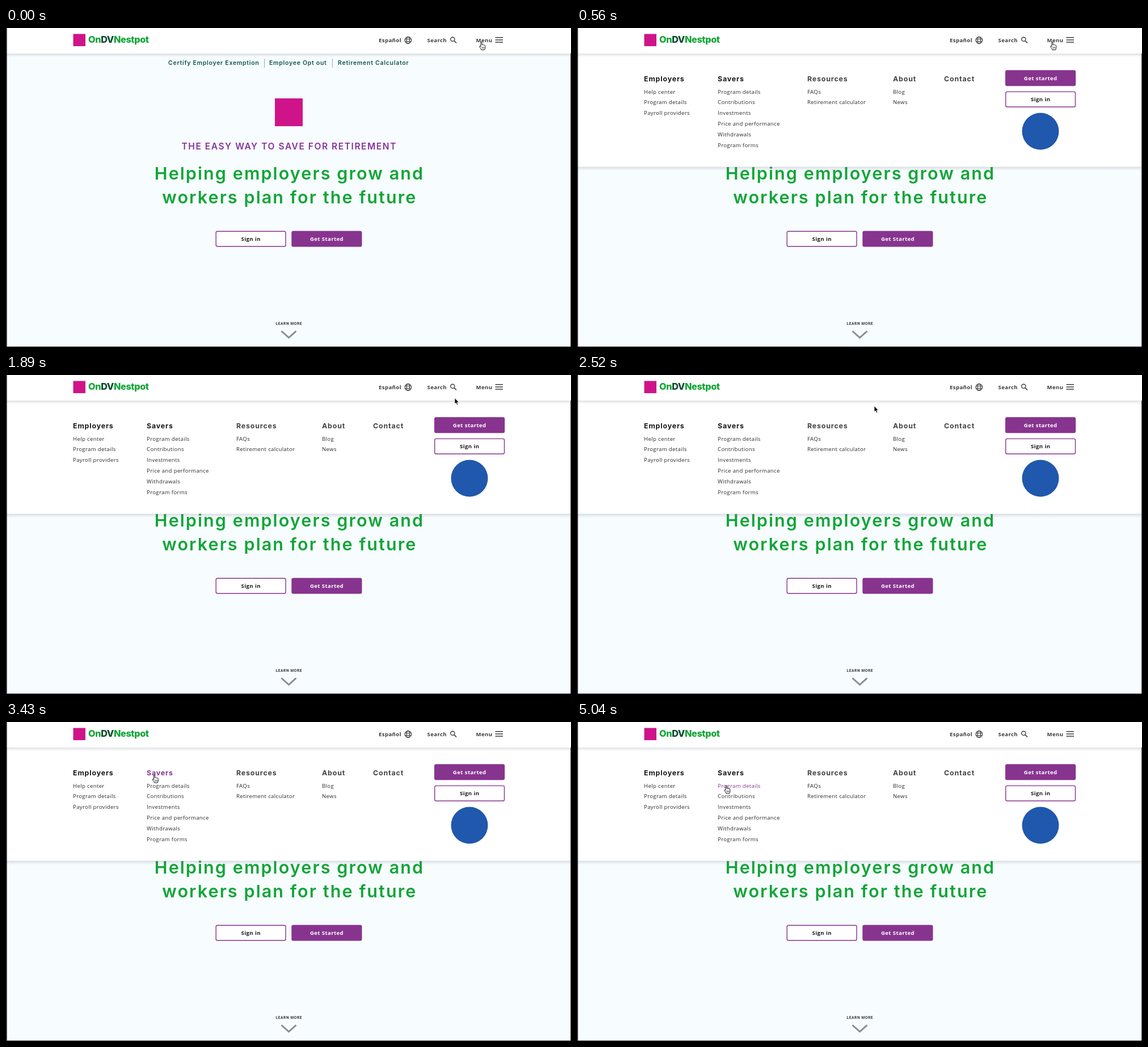
Recreate the animation shown at these times as an HTML page. Size 996 by 562 pixels, loop 5.18 s.

```html
<!DOCTYPE html>
<html lang="en">
<head>
<meta charset="utf-8">
<title>Savings site menu</title>
<style>
  html, body { margin: 0; width: 100%; height: 100%; overflow: hidden; background: #f7fcff; }
  svg { display: block; width: 100%; height: 100%; }
  .logo { font: 800 16.3px Inter, sans-serif; letter-spacing: -.4px; fill: #12a537; }
  .top { font: 700 9.6px "Open Sans", sans-serif; letter-spacing: .4px; fill: #3b3b3f; }
  .quick { font: 600 10.6px Inter, sans-serif; letter-spacing: .68px; fill: #10564c; }
  .lead { font: 600 15.5px Inter, sans-serif; letter-spacing: 1.56px; fill: #86329a; }
  .hero { font: 600 30.5px Inter, sans-serif; letter-spacing: 2.1px; fill: #12a537; }
  .btn { font: 700 9.6px "Open Sans", sans-serif; letter-spacing: .4px; }
  .more { font: 700 6.5px Roboto, sans-serif; letter-spacing: .65px; fill: #333; }
  .head { font: 700 12.4px Inter, sans-serif; letter-spacing: .85px; }
  .link { font: 400 9.6px "Open Sans", sans-serif; letter-spacing: .35px; }
  .icon { fill: none; stroke: #3b3b3f; }
</style>
</head>
<body>
<svg id="stage" viewBox="0 0 996 562" preserveAspectRatio="none">
  <defs>
    <linearGradient id="shade" x2="0" y2="1">
      <stop offset="0" stop-color="#5b6670" stop-opacity=".2"/>
      <stop offset="1" stop-color="#5b6670" stop-opacity="0"/>
    </linearGradient>
  </defs>
  <rect width="996" height="562" fill="#f7fcff"/>
  <g id="page">
    <path d="M455.5 54v16M575.5 54v16" stroke="#9aa5a8"/>
    <rect x="474" y="124" width="49" height="49" fill="#cf148a"/>
    <path d="M485.5 534l13 11.5 13-11.5" fill="none" stroke="#8b8c8e" stroke-width="3"/>
  </g>
  <g id="panel">
    <rect y="44" width="996" height="200.5" fill="#fff"/>
    <rect y="244.5" width="996" height="7" fill="url(#shade)"/>
    <circle cx="817" cy="182" r="32.5" fill="#1f58ad"/>
  </g>
  <g id="header">
    <rect y="45" width="996" height="6" fill="url(#shade)"/>
    <rect width="996" height="45" fill="#fff"/>
    <rect x="118.5" y="10.5" width="21.5" height="21.5" fill="#cf148a"/>
    <g class="icon" stroke-width="1.2">
      <circle cx="708.8" cy="21.5" r="5.8"/>
      <ellipse cx="708.8" cy="21.5" rx="2.6" ry="5.8"/>
      <path d="M703.5 19.5h10.6M703.5 23.5h10.6"/>
    </g>
    <g class="icon" stroke-width="1.4">
      <circle cx="787.3" cy="19.8" r="3.6"/>
      <path d="M790 22.5l4 4" stroke-width="1.7"/>
      <path d="M862.5 16.8h13.5M862.5 20.9h13.5M862.5 25h13.5" stroke-width="1.5"/>
    </g>
  </g>
  <path d="M0 0H1.6V562H0ZM995.2 45H996V562H995.2ZM0 561.2H996V562H0Z" fill="#171319"/>
  <g id="cursor" stroke-linejoin="round">
    <path id="arrow" d="M0 0V10.6L2.4 8.4 4 12.2 5.8 11.4 4.2 7.7H7.4Z" fill="#000" stroke="#fff" stroke-width=".8"/>
    <g id="hand" stroke="#111" stroke-width="1">
      <path fill="#fff" d="M-1 8V1a1 1 0 0 1 2 0V5.2C1.6 4.5 2.8 4.6 3 5.4 3.6 4.9 4.8 5.1 5 5.9 5.7 5.5 6.8 5.9 6.8 6.9V10C6.8 11.8 6 12.6 5.6 14H0C-.4 12-3.2 9.5-3.2 8.2-3.2 7.2-2 7-1 8.5Z"/>
      <path d="M1.2 8.8v3M2.9 8.8v3M4.6 8.8v3" stroke-width=".7"/>
    </g>
  </g>
</svg>
<script>
const LOOP = 5180, STEP = 70, OPEN_AT = 560;
const PURPLE = '#87348f', DARK = '#18181a', GREY = '#434347', LINK = '#2c2c30';
const $ = id => document.getElementById(id);

function add(parent, tag, attrs, text) {
  const el = document.createElementNS('http://www.w3.org/2000/svg', tag);
  for (const key in attrs) el.setAttribute(key, attrs[key]);
  if (text) el.textContent = text;
  return $(parent).appendChild(el);
}

function label(parent, style, x, y, text, attrs) {
  return add(parent, 'text', { class: style, x, y, ...attrs }, text);
}

function button(parent, x, y, text, solid) {
  add(parent, 'rect', {
    x: x + .7, y: y + .7, width: 122.8, height: 26.6, rx: 2.5,
    fill: solid ? PURPLE : '#fff', stroke: PURPLE, 'stroke-width': 1.4
  });
  label(parent, 'btn', x + 62.2, y + 17.4, text, { 'text-anchor': 'middle', fill: solid ? '#fff' : DARK });
}

const middle = { 'text-anchor': 'middle' };

// Landing page
label('page', 'quick', 286, 65.4, 'Certify Employer Exemption');
label('page', 'quick', 464, 65.4, 'Employee Opt out');
label('page', 'quick', 585, 65.4, 'Retirement Calculator');
label('page', 'lead', 499.2, 213.8, 'THE EASY WAY TO SAVE FOR RETIREMENT', middle);
label('page', 'hero', 499.5, 267, 'Helping employers grow and', middle);
label('page', 'hero', 499.8, 309.3, 'workers plan for the future', middle);
button('page', 369.5, 357.5, 'Sign in', false);
button('page', 503.3, 357.5, 'Get Started', true);
label('page', 'more', 498.8, 522.7, 'LEARN MORE', middle);

// Header
const brand = label('header', 'logo', 145, 26.3, '');
for (const [text, fill] of [['On', '#12a537'], ['DV', '#0b4a2d'], ['Nestpot', '#12a537']]) {
  const part = document.createElementNS(brand.namespaceURI, 'tspan');
  part.setAttribute('fill', fill);
  part.textContent = text;
  brand.appendChild(part);
}
label('header', 'top', 657, 25, 'Español');
label('header', 'top', 742.5, 25, 'Search');
label('header', 'top', 828.5, 24.6, 'Menu');

// Menu panel
const columns = [
  [118, DARK, 'Employers', 'Help center', 'Program details', 'Payroll providers'],
  [248, DARK, 'Savers', 'Program details', 'Contributions', 'Investments',
    'Price and performance', 'Withdrawals', 'Program forms'],
  [406, GREY, 'Resources', 'FAQs', 'Retirement calculator'],
  [557, GREY, 'About', 'Blog', 'News'],
  [647, GREY, 'Contact']
].map(([x, fill, title, ...links]) => [
  label('panel', 'head', x, 93.8, title, { fill }),
  ...links.map((text, i) => label('panel', 'link', x, 115.5 + i * 18.85, text, { fill: LINK }))
]);
const [savers, details] = columns[1];
button('panel', 755, 74.3, 'Get started', true);
button('panel', 755, 111.7, 'Sign in', false);

// Pointer path: time, x, y
const path = [
  [1470, 838, 24.5], [1890, 791, 40.5], [2520, 524, 54.5], [2590, 494, 55.5],
  [3150, 272, 74], [3430, 261.5, 93], [3640, 262, 97], [3850, 263, 112]
];

const rate = (i, k) => path[i] && path[i + 1]
  ? (path[i + 1][k] - path[i][k]) / (path[i + 1][0] - path[i][0]) : 0;

function slope(i, k) {
  const a = rate(i - 1, k), b = rate(i, k);
  return a * b > 0 ? 2 * a * b / (a + b) : 0;
}

// Monotone cubic through the path points
function along(t, k) {
  const last = path.length - 1;
  if (t <= path[0][0]) return path[0][k];
  if (t >= path[last][0]) return path[last][k];
  const i = path.findIndex(p => p[0] > t) - 1;
  const h = path[i + 1][0] - path[i][0], u = (t - path[i][0]) / h, v = 1 - u;
  return path[i][k] * (1 + 2 * u) * v * v + path[i + 1][k] * (3 - 2 * u) * u * u
    + h * u * v * (slope(i, k) * v - slope(i + 1, k) * u);
}

const show = (el, on) => el.setAttribute('visibility', on ? 'visible' : 'hidden');

function draw(ms) {
  const t = Math.floor(ms % LOOP / STEP) * STEP;
  const x = along(t, 1), y = along(t, 2);
  const onMenu = x > 826 && y < 30;
  const inColumn = x > 248 && x < 294;
  const onSavers = inColumn && y > 80 && y < 104;
  const onDetails = inColumn && y >= 104;
  const hot = onMenu || onSavers || onDetails;

  show($('panel'), t >= OPEN_AT);
  show($('hand'), hot);
  show($('arrow'), !hot);
  savers.setAttribute('fill', onSavers ? PURPLE : DARK);
  details.setAttribute('fill', onDetails ? PURPLE : LINK);
  $('cursor').setAttribute('transform', `translate(${x.toFixed(2)} ${y.toFixed(2)})`);
}

const start = performance.now();
function tick() {
  draw(performance.now() - start);
  requestAnimationFrame(tick);
}
tick();
</script>
</body>
</html>
```
